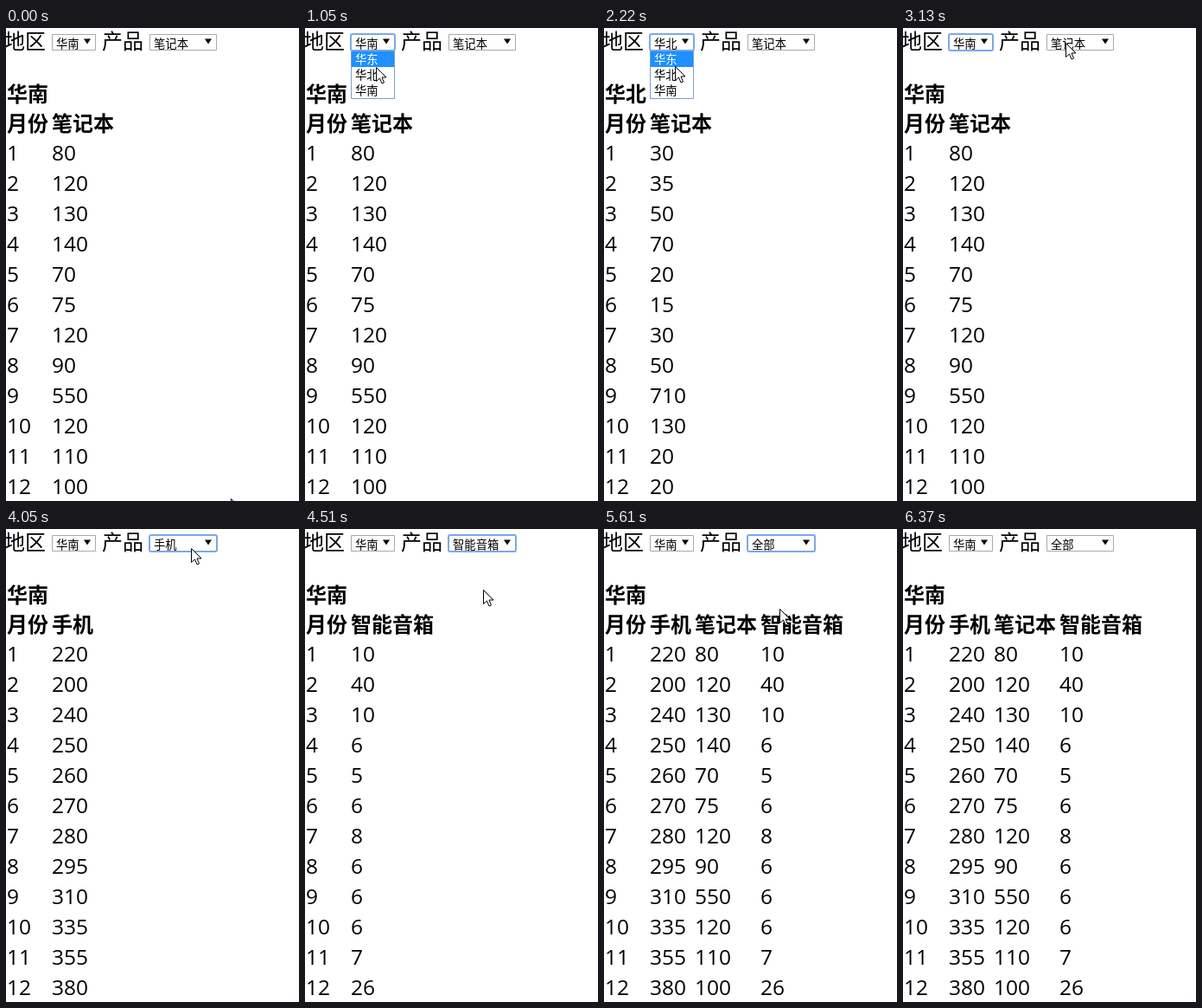
An HTML page with a canvas for the animation above (6450 ms loop, 339 by 546 pixels).

```html
<!DOCTYPE html>
<html lang="zh-CN">
<head>
<meta charset="utf-8">
<title>地区产品销量</title>
<style>
html, body { margin: 0; width: 100%; height: 100%; overflow: hidden; background: #fff; }
canvas { display: block; }
</style>
</head>
<body>
<canvas id="stage" width="339" height="546"></canvas>
<script>
const ctx = document.getElementById('stage').getContext('2d');
const LOOP = 6450, BLUR = 6370, ITEM = 18, LIST_TOP = 27;
const CJK = '"Noto Sans CJK SC", "Noto Sans CJK", sans-serif';
const LABEL = '24px ' + CJK, BOLD = 'bold 24px ' + CJK, SMALL = '13.33px ' + CJK;
const DIGITS = '24.5px "Open Sans", "Noto Sans", sans-serif';

const region = { x: 53, w: 51, items: ['华东', '华北', '华南'], initial: '华南' };
const product = { x: 166, w: 78, items: ['手机', '笔记本', '智能音箱', '全部'], initial: '笔记本' };
const sales = {
  华南: {
    手机: [220, 200, 240, 250, 260, 270, 280, 295, 310, 335, 355, 380],
    笔记本: [80, 120, 130, 140, 70, 75, 120, 90, 550, 120, 110, 100],
    智能音箱: [10, 40, 10, 6, 5, 6, 8, 6, 6, 6, 7, 26],
  },
  华北: { 笔记本: [30, 35, 50, 70, 20, 15, 30, 50, 710, 130, 20, 20] },
};

const choices = [
  { menu: region, open: 730, pick: 1360, value: '华北' },
  { menu: region, open: 1890, pick: 2590, value: '华南' },
  { menu: product, open: 3280, pick: 3820, value: '手机' },
  { menu: product, open: 4280, pick: 4510, value: '智能音箱' },
  { menu: product, open: 4970, pick: 5610, value: '全部' },
];

// pointer moves: start, end, x, y; it rests in between
const moves = [
  [70, 660, 86, 16], [850, 1150, 81, 55], [1360, 1740, 83, 18], [1890, 2520, 81, 66],
  [2820, 3130, 188, 17], [3200, 3440, 203, 53], [3590, 3670, 206, 38], [3820, 4050, 214, 22],
  [4200, 4430, 206, 70], [4510, 4820, 204, 18], [4970, 5250, 203, 92], [5610, 6220, 296, 550],
];

function pointerAt(t) {
  let x = 260, y = 543;
  for (const [start, end, toX, toY] of moves) {
    const u = Math.min(1, Math.max(0, (t - start) / (end - start)));
    const k = u * u * (3 - 2 * u);
    x += (toX - x) * k;
    y += (toY - y) * k;
  }
  return [Math.round(x), Math.round(y)];
}

function valueOf(menu, t) {
  const last = choices.filter(c => c.menu === menu && c.pick <= t).pop();
  return last ? last.value : menu.initial;
}

function text(str, x, y, font, color = '#000') {
  ctx.font = font;
  ctx.fillStyle = color;
  ctx.fillText(str, x, y);
}

function polygon(points, fill, stroke) {
  ctx.beginPath();
  points.forEach(([x, y]) => ctx.lineTo(x, y));
  ctx.closePath();
  ctx.fillStyle = fill;
  ctx.fill();
  if (stroke) {
    ctx.strokeStyle = stroke;
    ctx.lineWidth = 1;
    ctx.stroke();
  }
}

function box(x, y, w, h, color, width = 1, radius = 0) {
  ctx.beginPath();
  ctx.roundRect(x, y, w, h, radius);
  ctx.strokeStyle = color;
  ctx.lineWidth = width;
  ctx.stroke();
}

function drawSelect({ x, w }, value, focused) {
  if (focused) box(x, 7, w, 19, '#79a9ea', 2, 2);
  else box(x + .5, 7.5, w - 1, 18, '#a9a9a9');
  text(value, x + 5, 23, SMALL);
  const mid = x + w - 10;
  polygon([[mid - 4, 12.5], [mid + 4, 12.5], [mid, 18.5]], '#000');
}

function drawList({ x, w, items }, value, pointerY) {
  const hovered = Math.floor((pointerY - LIST_TOP - 2) / ITEM);
  const active = hovered < 0 ? items.indexOf(value) : Math.min(hovered, items.length - 1);
  const h = items.length * ITEM;
  ctx.fillStyle = '#fff';
  ctx.fillRect(x, LIST_TOP - 1, w, h + 2);
  box(x + .5, LIST_TOP - .5, w - 1, h + 1, '#7c9fc9');
  items.forEach((item, i) => {
    const y = LIST_TOP + i * ITEM;
    if (i === active) {
      ctx.fillStyle = '#1e90ff';
      ctx.fillRect(x + 1, y, w - 2, ITEM);
    }
    text(item, x + 5, y + 14, SMALL, i === active ? '#fff' : '#000');
  });
}

function drawTable(place, goods) {
  const columns = goods === '全部' ? product.items.slice(0, 3) : [goods];
  const months = Array.from({ length: 12 }, (_, i) => i + 1);
  let x = 1;
  text(place, x, 85, BOLD);
  for (const name of ['月份', ...columns]) {
    text(name, x, 119, BOLD);
    (sales[place][name] || months).forEach((v, i) => text(v, x, 153 + 35 * i, DIGITS));
    x += name.length * 24 + 4;
  }
}

function drawPointer(x, y) {
  const shape = [[0, 0], [0, 16], [4, 12.5], [6.5, 18.5], [9, 17.5], [6.5, 11.5], [11.5, 11.5]];
  polygon(shape.map(([dx, dy]) => [x + dx + .5, y + dy + .5]), '#fff', '#000');
}

function draw(t) {
  const [px, py] = pointerAt(t);
  const current = choices.filter(c => c.open <= t).pop();
  ctx.fillStyle = '#fff';
  ctx.fillRect(0, 0, 339, 546);
  text('地区', -2, 24, LABEL);
  text('产品', 111, 24, LABEL);
  for (const menu of [region, product]) {
    drawSelect(menu, valueOf(menu, t), current && current.menu === menu && t < BLUR);
  }
  drawTable(valueOf(region, t), valueOf(product, t));
  if (current && t < current.pick) drawList(current.menu, valueOf(current.menu, t), py);
  drawPointer(px, py);
}

function tick() {
  draw(performance.now() % LOOP);
  requestAnimationFrame(tick);
}
tick();
</script>
</body>
</html>
```
